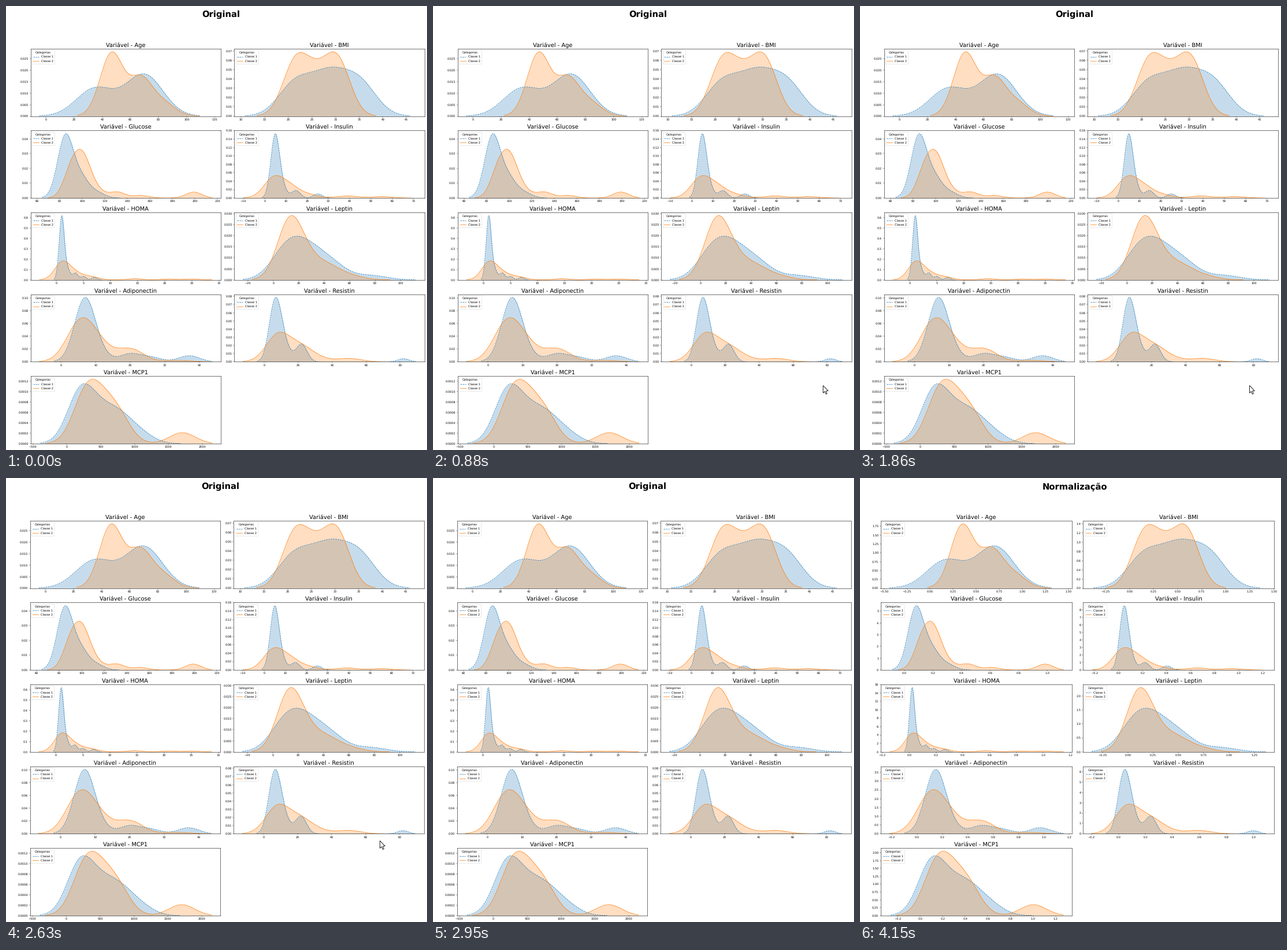
A matplotlib script for the animation above (8000 ms loop, 729 px wide and 768 px high).

```python
import numpy as np
import matplotlib.pyplot as plt
from matplotlib.animation import FuncAnimation
from matplotlib.patches import Polygon
from matplotlib.transforms import IdentityTransform

W, H, DPI = 729, 768, 36
LOOP, STEP = 8000, 20
STYLES = ("#1f77b4", "--", "Classe 1"), ("#ff7f0e", "-", "Classe 2")

plt.rcParams.update({
    "font.family": "DejaVu Sans",
    "font.size": 9.9,
    "axes.titlesize": 19.8,
    "axes.linewidth": 1.1,
    "text.hinting": "no_hinting",
})

# name: (data range, axis limits, then per class a bandwidth and the share
# of samples around each cluster centre)
VARIABLES = {
    "Age": ((24, 89), (-10.9, 124.1),
            (13.3, {35: 40, 69.9: 60}),
            (8.2, {46.7: 56, 67.5: 33, 84: 11})),
    "BMI": ((18.4, 38.6), (8.6, 48.8),
            (3.6, {21.6: 32, 28.6: 36, 35: 32}),
            (2.7, {21.5: 38, 25.8: 22, 30.4: 40})),
    "Glucose": ((75, 201), (54, 222.8),
                (6.9, {85: 72, 99: 22, 113: 6}),
                (7, {90.5: 33, 101: 42, 113: 8, 131: 7, 152: 3, 199: 7})),
    "Insulin": ((2.4, 58.5), (-14.3, 75.2),
                (2.03, {4.9: 75, 8.4: 11, 14.7: 9, 25: 5}),
                (4.7, {4.2: 54, 12: 28, 21: 8, 39: 6, 55: 4})),
    "HOMA": ((.47, 25.05), (-4.76, 30.3),
             (.48, {1: 74, 2.1: 11, 3.5: 8, 5: 4, 7: 3}),
             (1.4, {1.1: 60, 3.6: 20, 6.5: 10, 14.5: 4, 20.6: 3, 25: 3})),
    "Leptin": ((4.3, 83.4), (-30.8, 118.9),
               (12.5, {11: 42, 27: 31, 45: 21, 77: 6}),
               (9.9, {13: 66, 28: 17, 44: 13, 62: 4})),
    "Adiponectin": ((1.66, 38.04), (-8.8, 46.1),
                    (2.96, {6.9: 73, 11.5: 6, 20: 9, 26: 5, 37: 7}),
                    (3.7, {4.6: 38, 8: 30, 12.5: 12, 20.2: 18, 33.5: 2})),
    "Resistin": ((3.2, 82.1), (-17.6, 94.3),
                 (3.2, {5.4: 42, 9: 31, 14: 7, 22: 17, 82: 3}),
                 (7, {8.2: 58, 21.5: 29, 32: 6, 50: 7})),
    "MCP1": ((46, 1698), (-535, 2270),
             (200, {210: 50, 520: 20, 780: 21, 1080: 9}),
             (190, {265: 38, 480: 27, 750: 25, 1705: 10})),
}

fig = plt.figure(figsize=(W / DPI, H / DPI), dpi=DPI, facecolor="white")


def kernel_density(bandwidth, clusters, limits):
    """Weighted sum of equal Gaussian kernels with unit area."""
    centres = np.array(list(clusters))
    weights = np.array(list(clusters.values())) / 100
    margin = np.ptp(limits) / 22
    x = np.linspace(max(centres.min() - 3 * bandwidth, limits[0] + margin),
                    min(centres.max() + 3 * bandwidth, limits[1] - margin), 400)
    kernels = np.exp(-((x[:, None] - centres) / bandwidth) ** 2 / 2)
    return x, kernels @ weights / (bandwidth * np.sqrt(2 * np.pi))


def draw_panel(name, box, normalised):
    (low, high), limits, *classes = VARIABLES[name]
    shift, scale = (low, high - low) if normalised else (0, 1)
    ax = fig.add_axes(box)
    top = 0
    for density, (color, dash, label) in zip(classes, STYLES):
        x, y = kernel_density(*density, limits)
        x, y = (x - shift) / scale, y * scale
        ax.plot(x, y, dash, color=color, label=label)
        ax.fill_between(x, y, color=color, alpha=.25, linewidth=0)
        top = max(top, y.max())
    ax.set_xlim((np.array(limits) - shift) / scale)
    ax.set_ylim(0, 1.05 * top)
    ax.set_title(f"Variável - {name}")
    ax.legend(title="Categorias", loc="upper left")


def render_page(heading, centre, baseline, left, width, gap,
                pitch=141.6, normalised=False):
    """Draw one page of panels and return it as a picture."""
    fig.clear()
    fig.text(centre / W, 1 - baseline / H, heading, ha="center",
             va="baseline", size=29.6, weight="bold")
    for i, name in enumerate(VARIABLES):
        row, col = divmod(i, 2)
        x, bottom = left + col * (width + gap), 190.5 + row * pitch
        box = x / W, 1 - bottom / H, width / W, 116.8 / H
        draw_panel(name, box, normalised)
    fig.canvas.draw()
    return np.array(fig.canvas.buffer_rgba())


# start time: picture
PAGES = {
    0: render_page("Original", 372.5, 19, 42.5, 329.1, 23.8),
    1860: render_page("Original", 371.5, 19, 41.5, 329.1, 23.8),
    3850: render_page("Normalização", 372, 20, 36, 331.3, 19, 141.45, True),
    4150: render_page("Normalização", 372, 20, 35.8, 331.3, 19, 141.6, True),
}
fig.clear()

ARROW = np.array([(.5, .5), (.5, 13.4), (3.4, 10.7), (5.4, 15.4),
                  (7.4, 14.5), (5.4, 10), (9.3, 9.7)])
page = fig.figimage(PAGES[0])
cursor = Polygon(ARROW, facecolor="white", edgecolor="black", linewidth=1.7,
                 transform=IdentityTransform(), zorder=5)
fig.add_artist(cursor)


def cursor_tip(t):
    """Top left of the pointer in pixels, or None while it is hidden."""
    if t < 300 or t >= 2950:
        return None
    if t < 1860:
        u = min((t - 300) // 116, 5) / 5
        ease = 1 - (1 - u) ** 2
        return 695 - 20 * ease, 757 - 101 * ease
    if t < 2390:
        return 674, 656
    k = min((t - 2390) // 120, 2)
    return 673 - 13 * k, 655 - 14 * k


def update(frame):
    t = frame * STEP + STEP // 2
    page.set_data(PAGES[max(start for start in PAGES if start <= t)])
    tip = cursor_tip(t)
    cursor.set_visible(tip is not None)
    if tip:
        x, y = (ARROW + tip).T
        cursor.set_xy(np.column_stack((x, H - y)))
    return page, cursor


anim = FuncAnimation(fig, update, frames=LOOP // STEP, interval=STEP,
                     repeat=True, repeat_delay=0)
plt.show()
```
